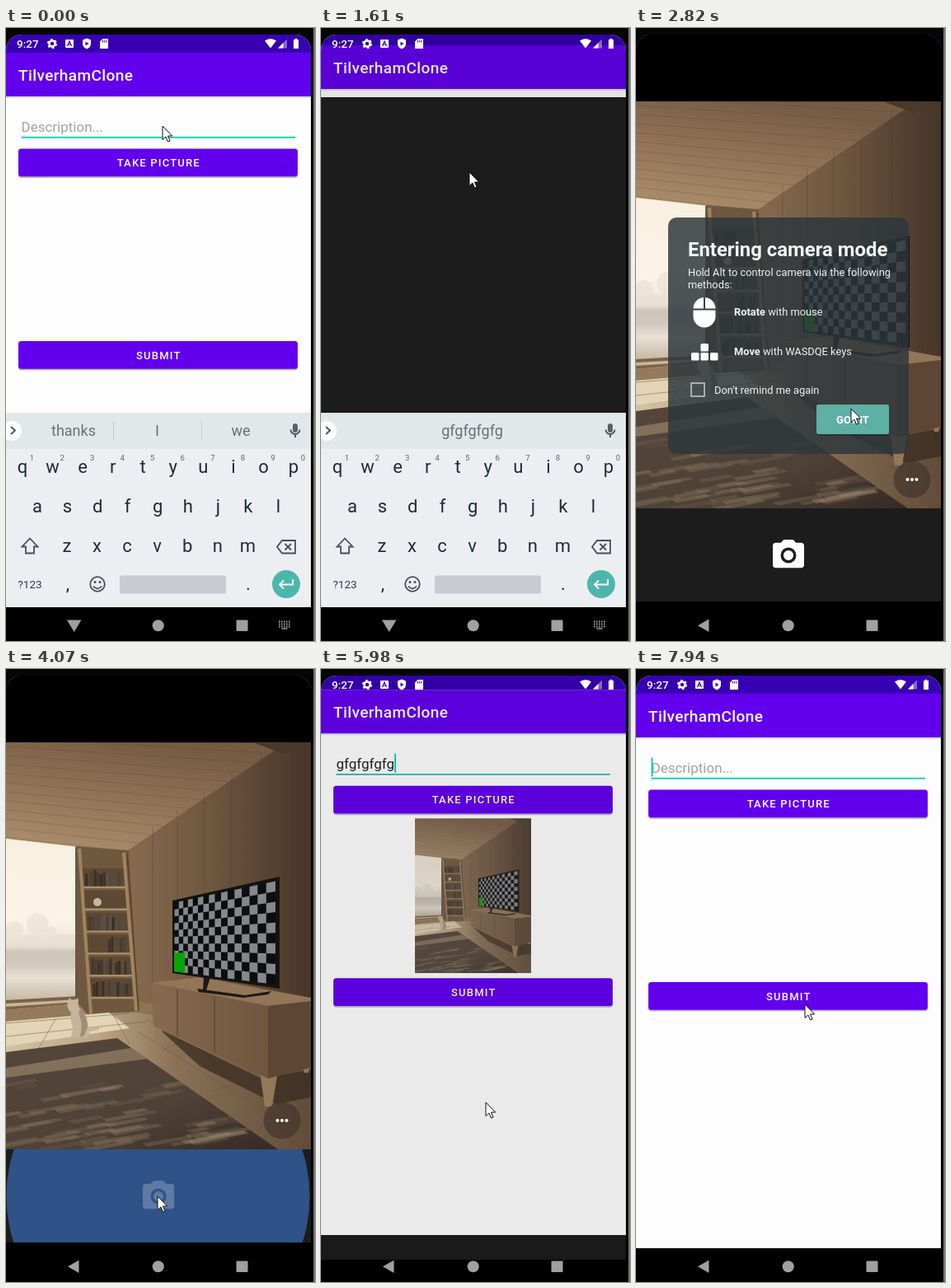
An HTML page for the animation above (8000 ms loop, 375x744 px).

```html
<!DOCTYPE html>
<html lang="en">
<head>
<meta charset="utf-8">
<title>Photo post demo</title>
<style>
html, body { margin: 0; width: 100%; height: 100%; overflow: hidden; background: #060606; }
svg { display: block; }
text { font-family: Roboto, sans-serif; white-space: pre; }
.mid { text-anchor: middle; }
.med { font-weight: 500; }
.btn { font-size: 13px; font-weight: 500; letter-spacing: 1.2px; fill: #fff; text-anchor: middle; }
.key { font-size: 22px; fill: #1f2d33; text-anchor: middle; }
.num { font-size: 9.5px; fill: #5d676b; text-anchor: middle; }
.sug { font-size: 18px; fill: #687174; text-anchor: middle; }
.tip { font-size: 12.85px; fill: #f1f3f3; }
.line { fill: none; stroke: #445156; stroke-width: 1.8; }
.soft { filter: blur(.8px); }
</style>
</head>
<body>
<svg id="stage" width="375" height="744" viewBox="0 0 375 744">
<defs>
  <clipPath id="screen"><rect y="8" width="370" height="760" rx="19"/></clipPath>
  <clipPath id="panel"><rect y="583" width="370" height="113"/></clipPath>
  <clipPath id="frame"><rect y="89.500" width="370" height="493.500"/></clipPath>
  <clipPath id="appClip"><rect id="appCut" y="0" width="370" height="702"/></clipPath>
  <clipPath id="ceilClip"><path d="M0 89H340L148 220 85 215 0 206Z"/></clipPath>
  <clipPath id="rugClip"><path d="M0 465 135 448 330 583H0Z"/></clipPath>
  <linearGradient id="ceil" x1=".1" y1="1" x2=".5" y2="0"><stop offset="0" stop-color="#ab8f6e"/><stop offset=".45" stop-color="#94775a"/><stop offset="1" stop-color="#755b44"/></linearGradient>
  <linearGradient id="wall"><stop offset="0" stop-color="#866b50"/><stop offset=".45" stop-color="#6f563f"/><stop offset="1" stop-color="#473529"/></linearGradient>
  <linearGradient id="sky" x1="0" y1="0" x2="0" y2="1"><stop offset="0" stop-color="#f8efdf"/><stop offset=".5" stop-color="#fbf4e7"/><stop offset=".66" stop-color="#eee5d9"/><stop offset=".7" stop-color="#cec5ba"/><stop offset=".78" stop-color="#d2c9be"/><stop offset=".86" stop-color="#e9e1d5"/><stop offset="1" stop-color="#c6b8a5"/></linearGradient>
  <linearGradient id="floor"><stop offset="0" stop-color="#d3c2a2"/><stop offset=".3" stop-color="#bda686"/><stop offset=".55" stop-color="#8b7257"/><stop offset="1" stop-color="#614c39"/></linearGradient>
  <linearGradient id="rug" x1="0" y1="0" x2="1" y2="1"><stop offset="0" stop-color="#55463a"/><stop offset=".6" stop-color="#4e4136"/><stop offset="1" stop-color="#352b25"/></linearGradient>
  <linearGradient id="front"><stop offset="0" stop-color="#866a50"/><stop offset="1" stop-color="#70563f"/></linearGradient>

  <g id="room" clip-path="url(#frame)">
    <rect y="89" width="370" height="494" fill="url(#floor)"/>
    <path d="M148 220 340 89H370V440L160 415Z" fill="url(#wall)"/>
    <path d="M85 214 149 219 161 416 85 420Z" fill="#70583f"/>
    <path d="M0 89H340L148 220 85 215 0 206Z" fill="url(#ceil)"/>
    <g id="planks" stroke="#5a432f" opacity=".24" clip-path="url(#ceilClip)"></g>
    <g id="boards" stroke="#3f2e20" opacity=".28"></g>
    <path d="M300 89H370V91L336 103Z" fill="#4a3828"/>
    <path d="M0 206 86 216V398L0 402Z" fill="url(#sky)"/>
    <g fill="#e4dace" opacity=".45"><circle cx="38" cy="309" r="13"/><circle cx="10" cy="317" r="11"/><circle cx="54" cy="320" r="8"/><path d="M0 322H86V338H0Z"/></g>
    <path d="M0 402 88 397V406L0 414Z" fill="#7a6248"/>
    <path d="M0 406 88 401V404L0 410Z" fill="#c9b495"/>
    <path d="M0 414 88 406 100 420 0 428Z" fill="#94795b"/>
    <path d="M84 216H88V400H84Z" fill="#6d5640"/>
    <path d="M160 404 178 406V420L160 417Z" fill="#8d7256"/>
    <path d="M0 428 125 417 150 436 0 458Z" fill="#e3d4b6"/>
    <path d="M0 446 170 428M0 430 150 418M60 425 40 460M130 420 150 455M170 425 370 545M160 440 370 572M215 452 190 462M290 500 250 512" stroke="#6b543f" opacity=".5" fill="none"/>
    <path d="M0 465 135 448 330 583H0Z" fill="url(#rug)"/>
    <path d="M0 484 152 460 172 473 0 496Z" fill="#9d886d" opacity=".65" clip-path="url(#rugClip)"/>
    <g id="streaks" fill="#a08b70" clip-path="url(#rugClip)"></g>
    <g id="shelf"></g>
    <path d="M89 218 103 419M143 223 158 415" stroke="#a0845f" stroke-width="4"/>
    <path d="M147 224 161 415" stroke="#59442f" stroke-width="1.500"/>
    <circle cx="111" cy="283" r="5" fill="#c8b79e"/>
    <path d="M186 437 310 497 370 486V520L328 528 235 482Z" fill="#392b21" opacity=".75"/>
    <path d="M75 404 77 399 80 402H84L87 399 88 410Q98 418 100 434L114 435 112 438 101 440Q102 447 96 447H79L81 434Q77 424 79 417 73 412 75 404Z" fill="#c6b59d"/>
    <path d="M90 412Q99 420 99 435L94 446H90Q94 430 88 418Z" fill="#a28d73"/>
    <path d="M180 430H192L185 456H181ZM308 488H330L323 531H314ZM358 478H370L367 490H362Z" fill="#957859"/>
    <path d="M176 381 235 374 370 399V404L318 409Z" fill="#937658"/>
    <path d="M176 381 318 409V497L179 433Z" fill="url(#front)"/>
    <path d="M318 409 370 403V484L318 497Z" fill="#5d4734"/>
    <path d="M208 389V446M253 398V466" stroke="#4f3c2b"/>
    <path d="M232 388 290 396 322 391 318 395 288 399 234 392ZM240 374H248L243 390H239Z" fill="#1c1815"/>
    <path d="M202 281 332 252V388L202 369Z" fill="#15130f"/>
    <path d="M204.500 283.500 327 257.500V383L204.500 367Z" fill="#0c0d10"/>
    <path id="checks" fill="#85878a"/>
    <path d="M204 345 217 344V369L204 367Z" fill="#0ba30a"/>
  </g>
  <g id="photo" clip-path="url(#frame)"><use href="#room" class="soft"/><rect y="89.500" width="370" height="493.500" fill="#8b8782" opacity=".14"/></g>
</defs>

<g clip-path="url(#screen)">
  <rect width="370" height="744"/>
  <rect id="under" y="600" width="370" height="117" fill="#1a1a1a"/>

  <g id="app" clip-path="url(#appClip)"><g id="slide">
    <rect width="370" height="720" fill="#fdfdfd"/>
    <rect y="-20" width="370" height="50" fill="#3700b3"/>
    <rect y="83" width="370" height="2" fill="#ddd"/>
    <rect y="30" width="370" height="53" fill="#6200ee"/>
    <text x="15" y="64" class="med" font-size="19" letter-spacing=".4" fill="#fff">TilverhamClone</text>
    <text id="hint" x="18.500" y="126" font-size="17" fill="#a3a3a3">Description...</text>
    <text id="typed" x="18.500" y="126" font-size="17" fill="#222"></text>
    <rect x="18.500" y="131.800" width="332.500" height="1.900" fill="#14cdbb"/>
    <rect id="caret" y="107.500" width="2" height="23" fill="#14cdbb"/>
    <g id="buttons"></g>
    <use id="thumb" href="#photo" transform="translate(114 152) scale(.381)"/>
  </g><rect id="dim" y="-20" width="370" height="740"/></g>

  <g id="cam">
    <rect id="cover" width="370" height="696" fill="#1c1c1c"/>
    <rect id="navBack" y="696" width="370" height="48"/>
    <g id="live">
      <rect width="370" height="90"/>
      <use id="view" href="#room"/>
      <use id="shot" href="#photo"/>
      <g id="more"><circle cx="335" cy="548" r="22.500" fill="#43372d" opacity=".72"/><g fill="#fff"><circle cx="329.500" cy="548" r="2"/><circle cx="335" cy="548" r="2"/><circle cx="340.500" cy="548" r="2"/></g></g>
      <circle id="ripple" cx="184.500" cy="640" fill="#2f5288" clip-path="url(#panel)"/>
      <path id="shutter" transform="translate(162.200 617.200) scale(1.9)" fill="#fff" fill-rule="evenodd" d="M9 2 7.170 4H4a2 2 0 0 0-2 2v12a2 2 0 0 0 2 2h16a2 2 0 0 0 2-2V6a2 2 0 0 0-2-2h-3.170L15 2ZM12 17a5 5 0 0 1 0-10 5 5 0 0 1 0 10ZM12 15.200a3.200 3.200 0 0 0 0-6.400 3.200 3.200 0 0 0 0 6.400Z"/>
      <g id="confirm" fill="none" stroke="#fff" stroke-width="2.200">
        <path d="M34 630.500 29 635.500 34 640.500M29.500 635.500H41A5.800 5.800 0 0 1 41 647.500H30.500"/>
        <path d="M169.500 639.500 179.500 649.500 200 628.500" stroke-width="3.200"/>
        <path d="M324.500 632 340 647.500M340 632 324.500 647.500"/>
      </g>
    </g>
  </g>

  <g id="status" fill="#fff">
    <text x="13" y="24" class="med" font-size="13.500">9:27</text>
    <circle cx="56" cy="19" r="3.500" fill="none" stroke="#fff" stroke-width="2.600"/>
    <circle cx="56" cy="19" r="5.200" fill="none" stroke="#fff" stroke-width="1.800" stroke-dasharray="2.700 2.745"/>
    <rect x="72" y="14" width="10" height="10" rx="1"/>
    <path d="M74.500 22 77 16 79.500 22M75.500 20H78.500" fill="none" stroke="#3700b3" stroke-width="1.200"/>
    <path d="M98 12.500 103 14.500V19Q103 23.500 98 25.500 93 23.500 93 19V14.500Z"/>
    <path d="M96.500 16.500 100.500 19 96.500 21.500Z" fill="#3700b3"/>
    <path d="M117.500 13H124V25H114V16.500Z"/>
    <path d="M117.500 15V17.500M119.600 15V17.500M121.700 15V17.500" stroke="#3700b3"/>
    <path d="M314 15.500Q321 10.500 328 15.500L321 24.500Z"/>
    <path d="M330 24.500 341 13.500V24.500Z" opacity=".4"/><path d="M330 24.500 336.500 18V24.500Z"/>
    <path d="M349 14H350.800V12.700H353.200V14H355V25H349Z"/>
  </g>

  <g id="kb">
    <rect y="467" width="370" height="236" fill="#eceef2"/>
    <rect y="467" width="370" height="43.500" fill="#e2e7e9"/>
    <g id="words"><text x="82" y="495" class="sug">thanks</text><text x="183.500" y="495" class="sug">I</text><text x="285" y="495" class="sug">we</text><path d="M130.500 477V500M237.500 477V500" stroke="#c5cacc"/></g>
    <text id="guess" x="183.500" y="495" class="sug"></text>
    <circle cx="7" cy="489" r="12" fill="#fff"/><path d="M6 484 11 488.500 6 493" class="line"/>
    <rect x="348" y="480" width="6" height="11" rx="3" fill="#566267"/><path d="M345.500 487.500A5.500 5.500 0 0 0 356.500 487.500M351 493V497" class="line"/>
    <g id="keys"></g>
    <path d="M29 619.500 38.500 629.500H34V637.500H24V629.500H19.500Z" class="line"/>
    <path d="M335 622H351V637.500H335L329 629.750ZM338.500 626 346 633.500M346 626 338.500 633.500" class="line"/>
    <text x="29" y="680" class="mid" font-size="13.500" fill="#2f3c41">?123</text>
    <text x="75" y="682" class="key">,</text><text x="294" y="682" class="key">.</text>
    <circle cx="111" cy="675" r="8.800" class="line"/><path d="M106 677.500Q111 683.500 116 677.500" class="line"/><circle cx="108" cy="672.500" r="1.500" fill="#445156"/><circle cx="114" cy="672.500" r="1.500" fill="#445156"/>
    <rect x="138" y="664.500" width="129" height="22" rx="2" fill="#c8cbd0"/>
    <circle cx="340" cy="675" r="17" fill="#4db6ac"/><path d="M348 669V675.500H332.500M337 670.500 332 675.500 337 680.500" fill="none" stroke="#fff" stroke-width="2"/>
    <rect y="703" width="370" height="41"/>
    <path d="M331 720.500H345M331 723.500H345M331 726.500H345" stroke="#999" stroke-width="1.800" stroke-dasharray="1.700 1.300"/><path d="M334.500 729H341.500" stroke="#999" stroke-width="1.500"/>
  </g>

  <g fill="#a0a0a0">
    <path id="down" d="M74 718.500H91.500L82.700 733Z"/><path id="back" d="M75 725.200 88.500 717.500V733Z"/>
    <circle cx="184.700" cy="725.200" r="7"/><rect x="279.500" y="718.500" width="14" height="13.500" rx="1"/>
  </g>

  <g id="dialog">
    <rect x="39" y="230" width="292" height="287" rx="10" fill="#2d373b" opacity=".83"/>
    <text x="63" y="277" font-weight="700" font-size="23.900" fill="#f4f5f5">Entering camera mode</text>
    <text x="63" y="301" class="tip">Hold Alt to control camera via the following</text>
    <text x="63" y="316" class="tip">methods:</text>
    <rect x="69.500" y="327" width="27" height="36.500" rx="13.500" fill="#fff"/><path d="M69 341.500H97M83 327V341" stroke="#384347" stroke-width="2"/>
    <text x="119" y="349" class="tip"><tspan font-weight="700">Rotate</tspan> with mouse</text>
    <g id="wasd" fill="#fff"></g>
    <text x="119" y="397" class="tip"><tspan font-weight="700">Move</tspan> with WASDQE keys</text>
    <rect x="67" y="431" width="16" height="16" fill="none" stroke="#b9bfc1" stroke-width="1.700"/>
    <text x="95" y="444" class="tip">Don't remind me again</text>
    <rect x="219" y="458.500" width="88" height="36" rx="2" fill="#1c2426" opacity=".6"/>
    <rect id="ok" x="219" y="457" width="88" height="36" rx="2" fill="#5eafa4"/>
    <text x="263" y="480" class="mid" font-size="13" font-weight="700" fill="#fff">GOT IT</text>
  </g>
</g>
<rect x="370" width="5" height="744"/><rect x="373" width="2" height="744" fill="#707070"/>
<path id="mouse" d="M0 0V16.500L3.900 13 6.500 19 9 18 6.500 12H11.700Z" fill="#fff" stroke="#111" stroke-width="1"/>
</svg>

<script>
const $ = id => document.getElementById(id);
const fill = (id, n, make) => $(id).innerHTML = Array.from({ length: n }, (_, i) => make(i)).join('');
let seed = 7;
const rnd = () => (seed = seed * 16807 % 2147483647) / 2147483647;

// Keyboard letters
const rows = [['qwertyuiop', 20, 540], ['asdfghjkl', 38, 588], ['zxcvbnm', 74, 636]];
$('keys').innerHTML = rows.map(([letters, x, y], r) => [...letters].map((c, i) => {
  const cx = x + 36.55 * i;
  const num = r ? '' : `<text x="${cx + 11.5}" y="525" class="num">${(i + 1) % 10}</text>`;
  return `<text x="${cx}" y="${y}" class="key">${c}</text>${num}`;
}).join('')).join('');

$('buttons').innerHTML = [['take', 146.5, 'TAKE PICTURE'], ['send', 380, 'SUBMIT']].map(([id, y, label]) =>
  `<rect x="15" y="${y + 1.5}" width="339" height="34" rx="3.5" fill="#bbb"/>
   <rect x="15" y="${y}" width="339" height="33.7" rx="3.5" fill="#6200ee"/>
   <rect id="${id}" x="15" y="${y}" width="339" height="33.7" rx="3.5" fill="#fff"/>
   <text x="185.3" y="${y + 21.7}" class="btn">${label}</text>`).join('');

fill('wasd', 4, i => `<rect x="${i < 3 ? 67 + 11.5 * i : 78.5}" y="${i < 3 ? 394 : 383}" width="9.5" height="9.5" rx="1.5"/>`);

// Room details
fill('planks', 13, i => `<path d="M0 ${72 + i * 11}L370 ${92 + i * 13}"/>`);
fill('boards', 7, i => {
  const x = 178 + i * 29 + i * i;
  return `<path d="M${x} ${212 - (x - 148) * .68}V${410}"/>`;
});
fill('streaks', 60, i => {
  const y = 500 + rnd() * 82, x = rnd() * 270 - 20, w = 20 + rnd() * 55;
  return `<path d="M${x} ${y}l${w} ${-w * .17} 6 3 ${-w} ${w * .19}Z" opacity="${.08 + rnd() * .3}"/>`;
});
fill('shelf', 6, i => {
  const y = 265 + i * 26.8, x = 92 + i * 1.9, w = 53 + i * .6;
  let books = '';
  if (i !== 1) for (let b = x + 4 + (i === 3 ? 22 : 0); b < x + w - 8; b += 3.6) {
    const h = 15 + rnd() * 5, v = 46 + rnd() * 36 | 0;
    books += `<rect x="${b}" y="${y - 1 - h}" width="3.2" height="${h}" fill="rgb(${v + 12},${v},${v - 12})"/>`;
  }
  return `<path d="M${x} ${y - 23}h${w}v23h${-w}Z" fill="#4a3929" opacity=".5"/>${books}
    <path d="M${x} ${y}h${w}" stroke="#ab8f6d" stroke-width="2.4"/>`;
});

// Checkerboard seen in perspective: the right edge is nearer
const cols = 16, lines = 10, hl = 83.5, hr = 125.5;
const spot = (c, r) => {
  const u = c / cols, f = u * hl / (u * hl + (1 - u) * hr);
  return `${(204.5 + 122.5 * f).toFixed(1)} ${(283.5 - 26 * f + (hl + (hr - hl) * f) * r / lines).toFixed(1)}`;
};
let d = '';
for (let c = 0; c < cols; c++) for (let r = 0; r < lines; r++)
  if ((c + r) % 2) d += `M${spot(c, r)}L${spot(c + 1, r)} ${spot(c + 1, r + 1)} ${spot(c, r + 1)}Z`;
$('checks').setAttribute('d', d);

// Step tables: [time, value...]
const mouse = [[0, 190, 119], [810, 187, 138], [940, 180, 165], [1470, 180, 170], [1610, 180, 175],
  [2390, 183, 190], [2530, 205, 270], [2680, 245, 400], [2820, 261, 462], [3400, 262, 465],
  [3550, 258, 480], [3720, 226, 560], [3900, 193, 625], [4070, 184, 640], [4630, 188, 632],
  [4780, 201, 604], [4930, 212, 579], [5080, 206, 600], [5200, 190, 624], [5330, 181, 633],
  [5580, 182, 636], [5830, 190, 592], [5980, 200, 526], [6130, 205, 470], [6260, 207, 430],
  [6400, 206, 410], [6530, 205, 405], [7940, 205, 407]];
const typing = [[0, 0], [150, 1], [280, 3], [410, 4], [540, 6], [670, 7], [810, 9], [7120, 0]];
const caretOn = [[0, 0], [150, 1], [1340, 0], [5700, 1], [6400, 0], [6800, 1], [7300, 0], [7630, 1]];
// app: shift, dim, bottom edge
const appMove = [[0, 0, 0, 703], [1470, -2, .03, 703], [1610, -9, .1, 703], [1740, -14, .12, 703],
  [5830, -12, .14, 520], [5980, -4.8, .075, 687], [6130, -2, .04, 697], [6260, -.5, .015, 702], [6400, 0, 0, 703]];
const coverTop = [[0, 744], [1610, 84], [1740, 40], [1870, 8]];
const takeGlow = [[0, 0], [1340, .16], [1470, .24], [1610, 0]];
const sendGlow = [[0, 0], [6800, .16], [6960, .24], [7120, .1], [7300, 0]];
// ripple: radius, opacity
const ripple = [[0, 0, 0], [3900, 95, 1], [4070, 184, 1], [4220, 184, .5], [4340, 0, 0], [5700, 110, .8], [5830, 0, 0]];

const pick = (table, t) => table.findLast(row => row[0] <= t).slice(1);
const show = (id, on) => $(id).style.display = on ? '' : 'none';
const set = (id, name, value) => $(id).setAttribute(name, value);

function render(t) {
  const between = (a, b) => t >= a && t < b;
  const text = 'gfgfgfgfg'.slice(0, pick(typing, t)[0]);
  $('typed').textContent = $('guess').textContent = text;
  show('hint', !text);
  show('words', !text);
  show('caret', pick(caretOn, t)[0]);
  set('caret', 'x', text ? 18.5 + $('typed').getComputedTextLength() : 18.5);

  const [shift, dim, bottom] = pick(appMove, t);
  set('slide', 'transform', `translate(0 ${shift})`);
  set('dim', 'opacity', dim);
  set('appCut', 'height', bottom);
  show('under', between(5830, 6130));
  show('thumb', between(5700, 7120));
  set('take', 'opacity', pick(takeGlow, t)[0]);
  set('send', 'opacity', pick(sendGlow, t)[0]);

  const taken = t >= 4220;
  const top = pick(coverTop, t)[0];
  show('cam', between(1610, 5830));
  set('cover', 'y', top);
  set('cover', 'height', Math.max(0, 696 - top));
  show('navBack', t >= 1870);
  show('live', t >= 2390);
  show('view', !taken);
  show('shot', taken);
  show('more', !taken);
  show('shutter', t < 4340);
  set('shutter', 'opacity', between(3900, 4340) ? .23 : 1);
  show('confirm', t >= 4340);
  const [r, alpha] = pick(ripple, t);
  set('ripple', 'r', r);
  set('ripple', 'opacity', alpha);

  show('dialog', between(2530, 3550));
  set('dialog', 'opacity', t < 2680 ? .6 : 1);
  set('ok', 'fill', t >= 3400 ? '#86c5bd' : '#5eafa4');
  show('status', !between(2390, 5830));
  show('kb', t < 2000);
  set('kb', 'transform', `translate(0 ${t >= 1870 ? 90 : 0})`);
  show('down', t < 2000);
  show('back', t >= 2000);
  set('mouse', 'transform', `translate(${pick(mouse, t).join(' ')})`);
}

function tick() {
  render(performance.now() % 8000);
  requestAnimationFrame(tick);
}
tick();
</script>
</body>
</html>
```
